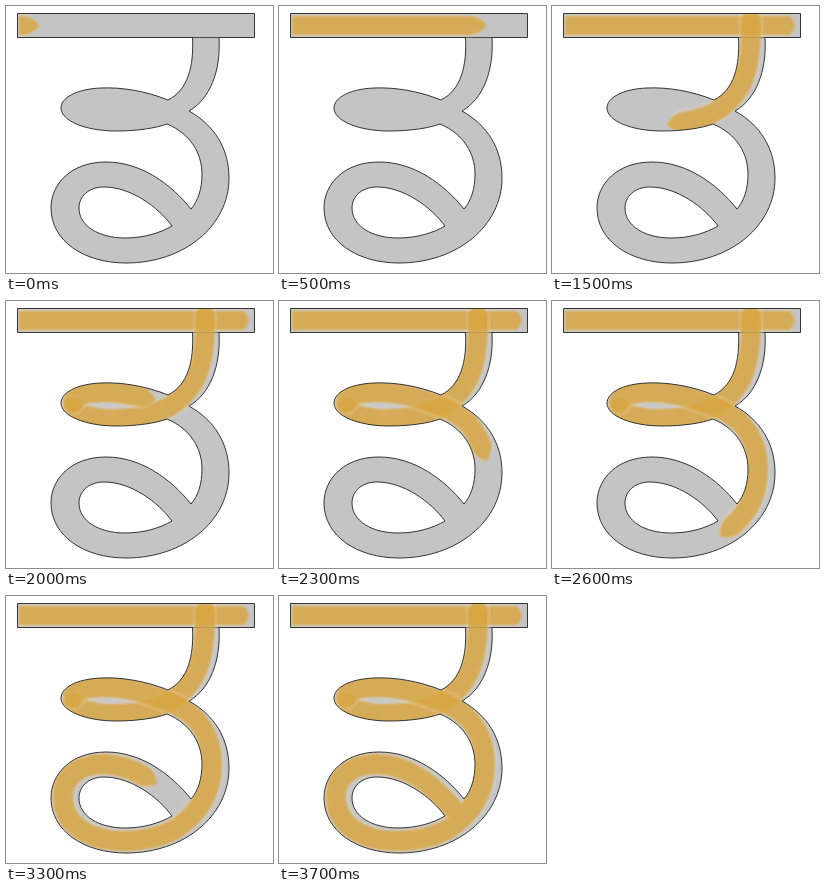
An HTML page that plays this animation: 267x267 px, repeating every 3800 ms.

```html
<!DOCTYPE html>
<html lang="hi">
<head>
<meta charset="utf-8">
<title>Letter stroke order</title>
<style>
html, body { margin: 0; width: 100%; height: 100%; overflow: hidden; background: #fff; }
svg { display: block; width: 100vw; height: 100vh; }
</style>
</head>
<body>
<svg viewBox="0 0 267 267">
  <defs>
    <path id="bar" d="M186.5 31.5H11.5V7.5H248.5V31.5H213"/>
    <path id="letter" d="M186.5 31.5C188 60 182 84 162 94C140 85 115 81 95 82C70 83 55 92 55 102C55 115 80 125 110 125C132 125 150 122 161 118C185 128 196 148 196 168C196 183 192 195 185 203C165 178 135 156 100 156C65 156 45 178 45 202C45 235 78 257 120 257C178 257 223 220 223 172C223 142 208 119 183 105C204 93 215 65 213 31.5M166 220C152 201 125 181 98 181C82 181 73 191 73 202C73 220 93 232 119 232C138 232 154 227 166 220Z"/>
    <clipPath id="inside">
      <use href="#bar"/>
      <use href="#letter" clip-rule="evenodd"/>
    </clipPath>
    <filter id="soft" filterUnits="userSpaceOnUse" x="0" y="0" width="267" height="267" color-interpolation-filters="sRGB">
      <feGaussianBlur stdDeviation="1.1"/>
    </filter>
  </defs>
  <g fill="#c4c4c4" fill-rule="evenodd">
    <use href="#bar"/>
    <use href="#letter"/>
    <path d="M186 31.5H213" stroke="#222" stroke-width=".8"/>
  </g>
  <g id="ink" clip-path="url(#inside)"></g>
  <g fill="none" stroke="#222" stroke-width=".9">
    <use href="#bar"/>
    <use href="#letter"/>
  </g>
</svg>
<script>
const LOOP = 3800, STEP = 100, TAPER = 16;
const ink = document.getElementById('ink');

function add(parent, tag, attrs) {
  const el = document.createElementNS('http://www.w3.org/2000/svg', tag);
  for (const k in attrs) el.setAttribute(k, attrs[k]);
  parent.appendChild(el);
  return el;
}

// keys: [time in ms, distance of the tip along the path]
const strokes = [
  { d: 'M13 19.5H243', width: 19.5, cap: 'butt', keys: [[0, 21], [600, 230]] },
  { d: 'M199 15C200 60 193 88 163 106C145 115 125 118 108 118C85 118 66 111 67 102',
    width: 20, cap: 'round', keys: [[1000, 18], [1100, 46], [1700, Infinity]] },
  { d: 'M67 102C68 94 84 91 98 91C125 91 150 100 168 108C195 120 206 143 206 168C206 200 190 220 168 234C150 243 135 245 118 245C82 245 57 228 57 200C57 182 72 168 98 168C130 169 155 189 176 215',
    width: 20.5, cap: 'round', keys: [[1700, 5], [2000, 88], [2600, 264], [3000, 406], [3400, Infinity]] }
];

function layer(s, color, opacity, grow) {
  const g = add(ink, 'g', { opacity, filter: 'url(#soft)' });
  const width = s.width + grow;
  const line = add(g, 'path', { d: s.d, fill: 'none', stroke: color, 'stroke-width': width, 'stroke-linecap': s.cap });
  const tip = add(g, 'path', { fill: color });
  return { g, line, tip, half: width / 2 };
}

for (const s of strokes) {
  s.layers = [layer(s, '#fff', 0.22, 4), layer(s, '#d7a033', 0.76, 0)];
  s.line = s.layers[1].line;
  s.length = s.line.getTotalLength();
}

function reach(s, t) {
  const keys = s.keys;
  if (t < keys[0][0]) return 0;
  for (let i = 1; i < keys.length; i++) {
    const [t0, a] = keys[i - 1], [t1, b] = keys[i];
    if (t < t1) return a + (Math.min(b, s.length) - a) * (t - t0) / (t1 - t0);
  }
  return s.length;
}

function drawStroke(s, t) {
  const len = Math.min(reach(s, t), s.length);
  const taper = Math.min(TAPER, Math.max(5, s.length - len));
  const body = Math.max(0.5, len - taper);
  const p = s.line.getPointAtLength(body);
  const q = s.line.getPointAtLength(Math.min(s.length, body + 2));
  const o = s.line.getPointAtLength(Math.max(0, body - 2));
  const angle = Math.atan2(q.y - o.y, q.x - o.x) * 180 / Math.PI;
  for (const { g, line, tip, half } of s.layers) {
    g.setAttribute('display', len > 0 ? 'inline' : 'none');
    line.setAttribute('stroke-dasharray', `${body} 2000`);
    // a long taper would be hidden by a round front, so use the tip alone
    line.setAttribute('stroke-linecap', body < 4 ? 'butt' : s.cap);
    tip.setAttribute('d', `M-1 ${-half}Q${taper * 0.6} ${-half * 0.9} ${taper} 0Q${taper * 0.6} ${half * 0.9} -1 ${half}Z`);
    tip.setAttribute('transform', `translate(${p.x} ${p.y}) rotate(${angle})`);
  }
}

function draw(ms) {
  const t = Math.floor(ms % LOOP / STEP) * STEP;
  for (const s of strokes) drawStroke(s, t);
}

const start = performance.now();
function frame() {
  draw(performance.now() - start);
  requestAnimationFrame(frame);
}
frame();
</script>
</body>
</html>
```
